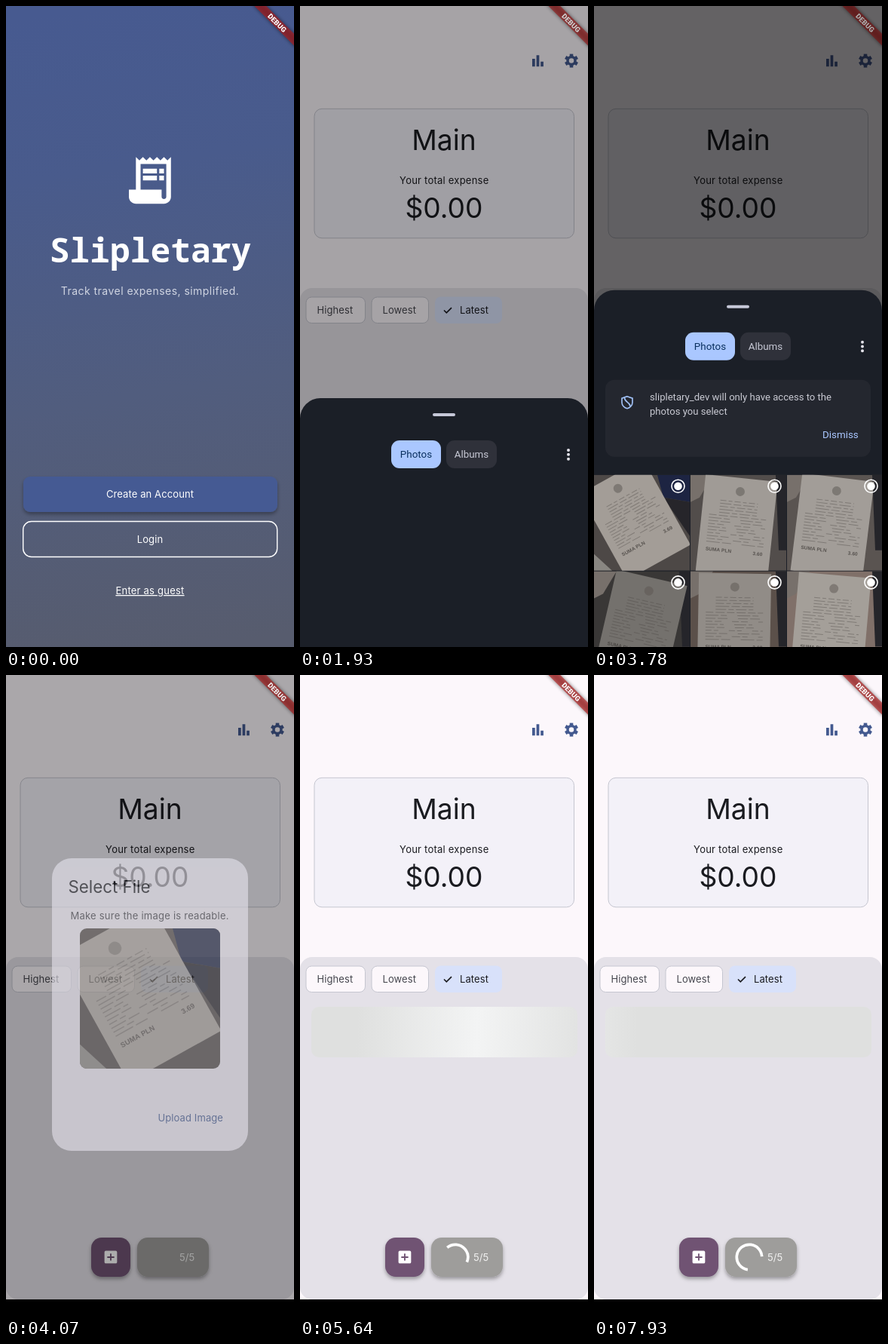
Animation of 382 by 850 pixels, one loop 8000 ms. Source, as an HTML page:

```html
<!DOCTYPE html>
<html lang="en">
<head>
<meta charset="utf-8">
<title>Slipletary</title>
<style>
html, body { margin: 0; height: 100%; overflow: hidden; background: #000; }
svg.stage { display: block; width: 100vw; height: 100vh; }
text { font: 13px Inter, sans-serif; letter-spacing: .1px; }
.mid { text-anchor: middle; }
.wide { letter-spacing: .23px; }
.big { font-size: 37.2px; letter-spacing: 0; }
.sheet text { font: 13.1px Roboto, sans-serif; letter-spacing: 0; }
.sheet .tab { font-size: 13.4px; }
.photo text, .sheet .photo text { font: bold 6.5px "Liberation Sans", sans-serif; fill: #3d3936; }
</style>
</head>
<body>
<svg class="stage" viewBox="0 0 382 850" preserveAspectRatio="none">
  <defs>
    <linearGradient id="night" gradientUnits="userSpaceOnUse" x1="130" y1="0" x2="260" y2="850">
      <stop offset="0" stop-color="#475a90"/><stop offset=".25" stop-color="#495b8c"/>
      <stop offset=".6" stop-color="#515d7e"/><stop offset="1" stop-color="#575c6e"/>
    </linearGradient>
    <linearGradient id="shine" gradientUnits="userSpaceOnUse" x1="0" y1="440" x2="1059" y2="473">
      <stop offset=".35" stop-color="#dfe0df"/><stop offset=".5" stop-color="#f3f4f4"/>
      <stop offset=".65" stop-color="#dfe0df"/>
    </linearGradient>
    <filter id="soft" x="-30%" y="-80%" width="160%" height="260%"><feGaussianBlur stdDeviation="3"/></filter>
    <filter id="lift" x="-20%" y="-20%" width="140%" height="160%">
      <feDropShadow dx="0" dy="3" stdDeviation="2.5" flood-color="#000" flood-opacity=".33"/>
    </filter>
    <clipPath id="round"><rect x="98" y="336" width="186" height="186" rx="9"/></clipPath>
    <g id="photos"></g>
  </defs>

  <g id="main">
    <rect width="382" height="850" fill="#fcf7fb"/>
    <path transform="translate(304.3 61.6) scale(.93)" fill="#43598f" d="M4 9h4v11H4zM16 13h4v7h-4zM10 4h4v16h-4z"/>
    <g id="gear" transform="translate(360 72.6)" stroke="#43598f" fill="none">
      <circle r="5" stroke-width="3.5"/>
    </g>
    <rect x="19" y="136.3" width="344.5" height="171.5" rx="10" fill="#f3f1f8" stroke="#c5c6d0"/>
    <g class="mid" fill="#1a1b20">
      <text class="big" x="191" y="190.5">Main</text>
      <text class="wide" x="191.3" y="236">Your total expense</text>
      <text class="big" x="191" y="280.5">$0.00</text>
    </g>
    <rect y="374" width="382" height="454" rx="16" fill="#e4e1e8"/>
    <g fill="#fcf7fb" stroke="#c5c6d0">
      <rect x="8" y="386" width="78.5" height="34.5" rx="7.5"/>
      <rect x="95" y="386" width="75.5" height="34.5" rx="7.5"/>
    </g>
    <rect x="179" y="385.5" width="89" height="35.5" rx="8" fill="#d8e1fa"/>
    <path d="M191 403.5l3.3 3.3 6.7-6.7" fill="none" stroke="#1a1b20" stroke-width="1.7"/>
    <g fill="#46474f">
      <text x="22.5" y="408">Highest</text>
      <text x="109.5" y="408">Lowest</text>
      <text x="212" y="408" fill="#1a1b20">Latest</text>
    </g>
    <rect id="bone" x="15" y="440" width="353" height="67" rx="10" fill="url(#shine)"/>
    <g filter="url(#lift)">
      <rect x="113" y="746" width="52" height="52" rx="14" fill="#6f5373"/>
      <rect x="174" y="746" width="95" height="52" rx="14" fill="#9e9d9b"/>
    </g>
    <path transform="translate(127.8 760.8) scale(.93)" fill="#fff" d="M19 3H5c-1.1 0-2 .9-2 2v14c0 1.1.9 2 2 2h14c1.1 0 2-.9 2-2V5c0-1.1-.9-2-2-2zm-2 10h-4v4h-2v-4H7v-2h4V7h2v4h4v2z"/>
    <circle id="spin" cx="206" cy="772" r="16.7" fill="none" stroke="#fff" stroke-width="3.7" pathLength="360"/>
    <text x="230" y="776.5" fill="#f1f1f0">5/5</text>
    <rect y="828" width="382" height="22"/>
  </g>

  <rect id="barrier" width="382" height="850"/>
  <g id="dialog">
    <rect x="61" y="243" width="260" height="388" rx="26" fill="#e7e4ee"/>
    <text x="82.5" y="289" fill="#1a1b20" style="font-size:22.3px;letter-spacing:0">Select File</text>
    <text class="wide" x="85.5" y="324" fill="#3f4048">Make sure the image is readable.</text>
    <g clip-path="url(#round)"><use href="#p0" x="98" y="336" width="186" height="186"/></g>
    <rect id="ripple" x="230" y="572" width="48" height="33" rx="16" fill="#43598f"/>
    <text x="201.5" y="591.5" fill="#43598f">Upload Image</text>
  </g>

  <g id="welcome">
    <rect width="382" height="850" fill="url(#night)"/>
    <path transform="translate(153.7 194) scale(3.1)" fill="#fff" d="M19.5 3.5L18 2l-1.5 1.5L15 2l-1.5 1.5L12 2l-1.5 1.5L9 2 7.5 3.5 6 2v14H3v3c0 1.66 1.34 3 3 3h12c1.66 0 3-1.34 3-3V2zM19 19c0 .55-.45 1-1 1s-1-.45-1-1v-3H8V5h11zM9 7h6v2H9zM16 7h2v2h-2zM9 10h6v2H9zM16 10h2v2h-2z"/>
    <g class="mid" fill="#fff">
      <text x="191.5" y="340" style="font:bold 44.6px 'Noto Sans Mono',monospace;letter-spacing:0">Slipletary</text>
      <text x="191" y="383" fill="#d0d5e2" style="font-size:14px;letter-spacing:.46px">Track travel expenses, simplified.</text>
      <rect x="23" y="624" width="337" height="47" rx="9" fill="#455a93" filter="url(#lift)"/>
      <text x="191" y="652">Create an Account</text>
      <rect x="22.7" y="683.5" width="337" height="47" rx="11" fill="none" stroke="#fff" stroke-width="1.4"/>
      <text x="191" y="711.5">Login</text>
      <text class="wide" x="191" y="780" text-decoration="underline">Enter as guest</text>
    </g>
  </g>

  <rect id="dim" width="382" height="850"/>
  <g id="banner" transform="translate(382 0) rotate(45) scale(.929)">
    <rect x="-44" y="28" width="88" height="12" opacity=".5" filter="url(#soft)"/>
    <rect x="-44" y="28" width="88" height="12" fill="#b71c1c" opacity=".63"/>
    <text class="mid" y="37.7" fill="#fff" style="font:900 10.2px Roboto,sans-serif;letter-spacing:0">DEBUG</text>
  </g>

  <g id="sheet" class="sheet">
    <rect width="382" height="900" rx="27" fill="#1b1f27"/>
    <rect x="176" y="20" width="30" height="4" rx="2" fill="#c6c8d8"/>
    <rect x="121" y="56" width="66" height="37" rx="11" fill="#aac7ff"/>
    <rect x="194" y="56" width="67" height="37" rx="11" fill="#2f313a"/>
    <g class="mid">
      <text class="tab" x="154" y="79" fill="#0a305f">Photos</text>
      <text class="tab" x="227.5" y="79" fill="#c6c8d4">Albums</text>
    </g>
    <g fill="#e3e2e9"><circle cx="356" cy="69" r="2"/><circle cx="356" cy="74.8" r="2"/><circle cx="356" cy="80.6" r="2"/></g>
    <g id="content">
      <rect x="15" y="119" width="352" height="102" rx="12" fill="#24272f"/>
      <path transform="translate(44 149)" d="M0-8L7-5.5V0C7 4 3.5 7 0 8-3.5 7-7 4-7 0V-5.5zM-3.5-6C-3 0 4 0 4 5" fill="none" stroke="#a0c0f5" stroke-width="1.7"/>
      <g fill="#c9cad3">
        <text x="74" y="146.500">slipletary_dev will only have access to the</text>
        <text x="74" y="165.500">photos you select</text>
      </g>
      <text class="tab" x="303" y="196" fill="#aac7ff">Dismiss</text>
      <g id="grid"></g>
      <text class="tab" x="15" y="656" fill="#e3e2e9">August</text>
    </g>
  </g>
</svg>
<script>
const $ = id => document.getElementById(id);
const set = (id, name, value) => $(id).setAttribute(name, value);
const show = (id, alpha) => {
  $(id).style.display = alpha > 0 ? '' : 'none';
  set(id, 'opacity', alpha);
};

// Receipt photos: centre, turn, paper, backdrop, total
const shots = [
  [55, 60, -29, '#a39d97', '#4d4846', '3.69'],
  [61, 70, 6, '#a09b96', '#524d4b', '3.60'],
  [60, 69, 7, '#a29d98', '#5a5451', '3.60'],
  [62, 73, 13, '#74716d', '#393736', '3.60'],
  [58, 69, 1, '#918c87', '#5b504a', '3.60'],
  [58, 71, 5, '#a49f99', '#807069', '17.35'],
  [57, 70, 8, '#a8a29b', '#54504d', '17.35'],
  [63, 67, 17, '#b2ada8', '#4a4644', '3.60'],
  [68, 67, -20, '#a49f99', '#433e3c', '17.35']
];

function photo([x, y, turn, paper, back, sum], i) {
  let rows = '';
  for (let r = 0; r < 15; r++) {
    const dash = `${8 + r * 7 % 11} 3 ${5 + r * 5 % 9} ${r > 5 ? 14 : 3}`;
    const inset = r < 5 ? 18 : 5;
    rows += `<path d="M${inset - 43} ${r * 4 - 34}H${43 - inset}" stroke-dasharray="${dash}"/>`;
  }
  const desk = i ? '<path d="M113 0h14v100h-10z" fill="#25252a"/><path d="M0 0h30L12 30 0 36z" fill="#77706b"/>'
    : '<path d="M84 0h43v36L92 30z" fill="#1d2442"/><path d="M92 30l35 6v45z" fill="#26252a"/><path d="M0 105l24 22H0z" fill="#898681"/>';
  return `<symbol id="p${i}" viewBox="0 0 127 127"><g class="photo">
    <rect width="127" height="127" fill="${back}"/>${desk}
    <g transform="translate(${x} ${y}) rotate(${turn})">
      <rect x="-48" y="-66" width="96" height="130" fill="${paper}"/>
      <circle cy="-48" r="6" fill="#5b5652" opacity=".5"/>
      <g stroke="#4b4643" opacity=".4">${rows}</g>
      <g opacity=".75"><text x="-38" y="34">SUMA PLN</text><text x="38" y="34" text-anchor="end">${sum}</text></g>
    </g></g></symbol>`;
}

function cell(_, i) {
  const x = i % 3 * 128, y = 245 + Math.floor(i / 3) * 127.7;
  return `<use href="#p${i}" x="${x}" y="${y}" width="127" height="127"/>
    <g transform="translate(${x + 111.5} ${y + 15})"><circle r="5.3" fill="#fff"/>
    <circle r="8.5" fill="none" stroke="#fff" stroke-width="1.6"/></g>`;
}

$('photos').innerHTML = shots.map(photo).join('');
$('grid').innerHTML = shots.map(cell).join('');
for (let a = 0; a < 360; a += 60)
  $('gear').innerHTML += `<path d="M0-6v-3" stroke-width="4.6" transform="rotate(${a})"/>`;

// Linear track through [time, value] pairs
function track(t, ...keys) {
  if (t <= keys[0][0]) return keys[0][1];
  for (let i = 1; i < keys.length; i++) {
    const [a, v] = keys[i - 1], [b, w] = keys[i];
    if (t <= b) return v + (w - v) * (t - a) / (b - a);
  }
  return keys[keys.length - 1][1];
}

// Curve cubic-bezier(.4, 0, .2, 1), solved by bisection
function ease(x) {
  x = Math.min(1, Math.max(0, x));
  let lo = 0, hi = 1, s = .5;
  for (let i = 0; i < 20; i++) {
    s = (lo + hi) / 2;
    if (1.2 * s * (1 - s) ** 2 + .6 * s * s * (1 - s) + s ** 3 < x) lo = s; else hi = s;
  }
  return s * s * (3 - 2 * s);
}

function spinner(ms) {
  const u = ms / 1333 % 1, head = ease(u * 2), tail = ease(u * 2 - 1);
  const start = -90 + tail * 270 + ms / 2222 * 360 + u * 90;
  const sweep = Math.max(14, (head - tail) * 270);
  set('spin', 'stroke-dasharray', `${sweep} ${360 - sweep}`);
  set('spin', 'transform', `rotate(${start % 360} 206 772)`);
}

function draw(now) {
  const step = 1000 / 7;
  const t = 500 + Math.floor((now % 8000 - 494) / step) * step;

  show('welcome', track(t, [357, 1], [643, 0]));

  const top = track(t, [1700, 850], [1786, 700], [1929, 519.5], [2071, 350], [2214, 250], [2357, 205], [2500, 191],
    [3571, 191], [3643, 225], [3786, 377], [3929, 620], [4071, 850]);
  const dim = track(t, [1643, 0], [1929, .34], [2214, .6], [3786, .6], [3929, .42], [4071, 0]);
  set('sheet', 'transform', `translate(0 ${top})`);
  show('sheet', top < 850 ? 1 : 0);
  show('content', track(t, [2071, 0], [2357, 1]));
  show('dim', dim);

  const alpha = track(t, [3929, 0], [4071, .6], [4214, 1], [4786, 1], [4929, .9], [5071, 0]);
  show('dialog', alpha);
  show('barrier', alpha * .54);
  show('ripple', t > 4750 ? .1 : 0);
  $('banner').style.filter = `brightness(${1 - dim * .55 - alpha * .1})`;

  const busy = t > 4900 ? 1 : 0;
  show('bone', busy);
  show('spin', busy);
  if (busy) {
    const p = (t - 4800) / 1500 % 1;
    set('shine', 'gradientTransform', `translate(${15 + 353 * (2 * p - 2)} 0)`);
    spinner(t < 5000 ? 40 : t - 4760);
  }
}

function loop() {
  draw(performance.now());
  requestAnimationFrame(loop);
}
loop();
</script>
</body>
</html>
```
